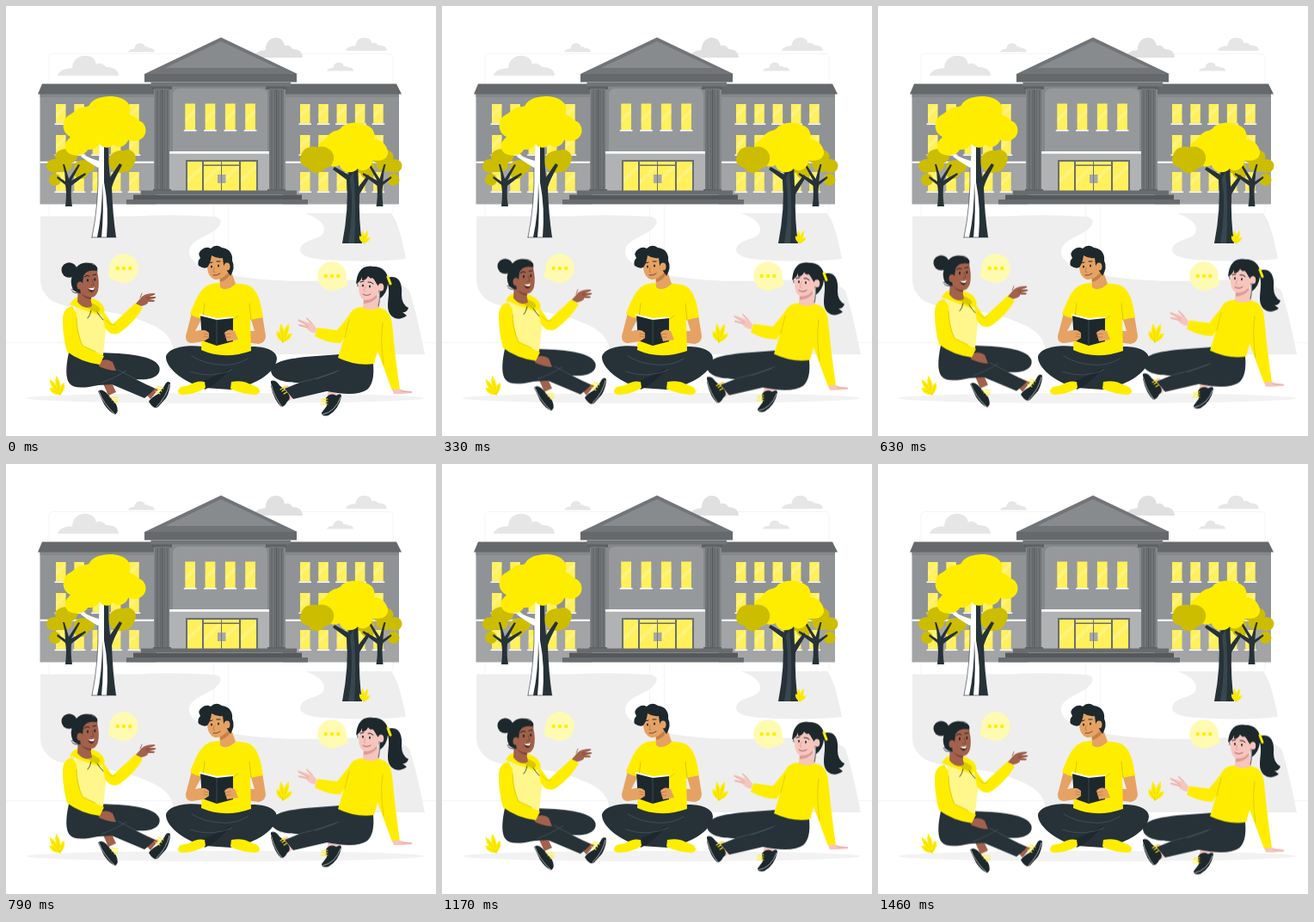
Recreate the animation shown at these times as an HTML page with a canvas. Size 500 by 500 pixels, loop 1.5 s.

```html
<!DOCTYPE html>
<html lang="en">
<head>
<meta charset="utf-8">
<title>Students in front of a school</title>
<style>
html, body { margin: 0; width: 100%; height: 100%; overflow: hidden; background: #fff; }
canvas { display: block; width: 500px; height: 500px; }
</style>
</head>
<body>
<canvas id="stage"></canvas>
<script>
const LOOP = 1500, PEAK = 690, LIFT = 10, START = 0.8;
const YELLOW = '#ffed00', PALE = '#fff68c', BUBBLE = '#fffab2', OCHRE = '#cdbd00', DARK = '#263238', INK = '#1d282d';
const BROWN = '#a2614b', BROWN_SHADE = '#7d4334', TAN = '#e5a263', PINK = '#f6c5bd', PINK_SHADE = '#dc9c96';
const WALL = '#8f9396', WALL_LIGHT = '#96999c', STONE = '#727577', STONE_DARK = '#5d6163', GROUND = '#eeeeee';

const canvas = document.getElementById('stage');
const scale = window.devicePixelRatio || 1;
canvas.width = canvas.height = 500 * scale;
let c = canvas.getContext('2d');

const fill = (color, d) => { c.fillStyle = color; c.fill(new Path2D(d)); };
const line = (color, width, d) => {
  c.strokeStyle = color;
  c.lineWidth = width;
  c.stroke(new Path2D(d));
};
const box = (color, x, y, w, h) => { c.fillStyle = color; c.fillRect(x, y, w, h); };
const oval = (color, x, y, rx, ry = rx) => {
  c.fillStyle = color;
  c.beginPath();
  c.ellipse(x, y, rx, ry, 0, 0, 7);
  c.fill();
};

function layer(paint) {
  const sheet = document.createElement('canvas');
  sheet.width = sheet.height = 500 * scale;
  const main = c;
  c = sheet.getContext('2d');
  c.scale(scale, scale);
  c.lineCap = c.lineJoin = 'round';
  paint();
  c = main;
  return sheet;
}

function cloud(x, y, w, h, color = '#e6e6e6') {
  const px = u => x + u * w, py = v => y + v * h;
  fill(color, `M${px(0)} ${py(1)}Q${px(.03)} ${py(.64)} ${px(.24)} ${py(.62)}
    C${px(.25)} ${py(-.2)} ${px(.62)} ${py(-.18)} ${px(.63)} ${py(.42)}
    Q${px(.72)} ${py(.3)} ${px(.79)} ${py(.56)}Q${px(.99)} ${py(.55)} ${px(1)} ${py(1)}Z`);
}

function glass(x, y, w, h) {
  box('#fff05c', x, y, w, h);
  c.save();
  c.beginPath();
  c.rect(x, y, w, h);
  c.clip();
  line('rgba(255,255,255,.2)', 4, `M${x - 3} ${y + h * .75}l${w + 6} ${-w - 6}`);
  c.restore();
}

function pane(x, y, w, h) {
  glass(x, y, w, h);
  box('#fff', x - 1.5, y + h, w + 3, 1.6);
}

function wing(x, w, firstWindow) {
  box(WALL, x, 102, w, 79);
  box('#a2a4a6', x, 181, w, 49.5);
  box('#858889', x, 102, w, 4);
  box('#fff', x, 180.7, w, 2);
  for (const y of [114, 150, 193])
    for (let i = 0; i < 5; i++) pane(firstWindow + i * 21.3, y, 11.5, 22.5);
}

function pillars(x) {
  box(STONE_DARK, x - 4, 93, 24, 4);
  box(STONE, x, 96, 17, 119);
  for (const dx of [2.5, 6, 10.5, 14]) box('#606466', x + dx, 98, 1, 117);
  box('#55595b', x + 8, 97, 1.2, 118);
  box(STONE_DARK, x - 2, 213, 21, 3);
}

function building() {
  wing(39.5, 135, 58);
  wing(322, 135, 342);
  fill('#66696b', 'M42 90.5H174V102.5H37Z');
  fill('#66696b', 'M322 90.5H454L460 102.5H322Z');

  box('#85888a', 172, 90, 153, 127);
  fill(WALL_LIGHT, 'M194 172V104Q194 96 202 96H296Q304 96 304 104V172Z');
  box('#b0b2b4', 190, 172, 116, 43);
  for (let i = 0; i < 4; i++) pane(208.3 + i * 23.3, 113.5, 11.7, 30.5);
  box('#fff', 190, 169, 117, 2.8);
  pillars(173);
  pillars(306);

  fill(STONE, 'M161 79L250 36.5L339 79Z');
  fill('#888b8d', 'M185 72L250 41L316 72Z');
  box('#66696b', 161, 79, 177, 9.5);
  box(STONE, 168.5, 88.5, 162.5, 5);

  box('#6b6e70', 209, 179, 84, 37);
  glass(211, 181, 17, 34.5);
  for (const x of [230, 251]) {
    glass(x, 181, 20, 3.5);
    glass(x, 186, 20, 29.5);
  }
  glass(273, 181, 18, 34.5);
  box('#a5a7a8', 246, 196, 9.5, 10);
  box('#777', 250, 196, 1, 10);

  box('#696c6e', 157, 214.5, 181, 5);
  box('#56595b', 148, 219.5, 196, 5.5);
  box('#696c6e', 140, 225, 211, 5.5);
}

function smallTree(x, flip) {
  c.save();
  c.translate(x, 0);
  c.scale(flip, 1);
  for (const [dx, y, rx, ry] of [[-3, 175, 13, 9], [-17, 186, 9, 8], [18, 187, 12, 8], [14, 195, 8, 6], [-6, 185, 10, 8], [-16, 202, 7, 7]])
    oval(OCHRE, dx, y, rx, ry);
  fill(DARK, 'M-4 233Q-2 215-4 208L-14 200L-13 198L-4 204Q-4 194-7 184L-5 184L0 201L11 184L13 185L3 203L19 194L20 196L3 209Q2 222 4 233Z');
  c.restore();
}

function trees() {
  smallTree(73, 1);
  smallTree(434.5, -1);

  oval(OCHRE, 134, 181, 15, 13);
  oval(OCHRE, 141, 177, 10, 10);
  fill('#fff', 'M100 269Q108 230 107 188Q98 183 87 175L89 172Q99 178 108 180L109 155H119L118 269Z');
  fill(DARK, 'M117 269Q120 235 114 205Q114 185 114 163L119 160Q119 185 121 199L132 183L135 185Q125 203 123 211Q124 242 128 269Z');
  fill(DARK, 'M106 269Q112 242 112 205Q114 240 111 269Z');
  line(DARK, .6, 'M100 269Q108 230 107 188M100 269H128');
  fill(YELLOW, `M82 121C89 115 95 119 97 115C103 103 133 101 142 113Q146 119 143 125
    C149 129 153 131 154 133C164 136 165 149 158 154C149 160 145 155 142 156
    C138 166 127 165 125 161C120 167 111 165 109 160C104 167 99 167 95 167
    C91 176 72 176 69 166C67 158 74 154 75 152C63 147 65 130 75 126Q78 124 82 121Z`);

  fill(DARK, 'M391 276Q399 235 396 202L380 190L382 187L398 196L399 180H409L410 210L421 196L423 199L411 219Q410 248 414 276Z');
  fill('#37474f', 'M398 276Q405 235 400 200L404 192Q408 235 405 276Z');
  fill(YELLOW, `M376 149C383 143 386 147 391 140C400 133 419 135 426 143Q430 150 428 155
    C440 155 445 167 444 172C441 182 431 179 426 180C426 190 413 194 409 189
    C403 197 389 193 388 185C380 189 371 185 374 177C360 175 360 159 369 157Q372 153 376 149Z`);
  fill(OCHRE, 'M343 174C345 165 354 162 362 164C374 161 383 170 381 179C379 187 374 188 371 189C366 196 354 196 352 188C344 187 340 181 343 174Z');
}

function sprout(x, y, size, tilt) {
  c.save();
  c.translate(x, y);
  c.rotate(tilt);
  c.scale(size, size);
  for (const [turn, length] of [[-.6, 15], [-.2, 22], [.2, 23], [.7, 15]]) {
    c.save();
    c.rotate(turn);
    fill(YELLOW, `M0 0Q-6 ${-length * .55} 0 ${-length}Q5 ${-length * .55} 0 0Z`);
    line('#d9ca00', .5, `M0 0L0 ${-length * .7}`);
    c.restore();
  }
  c.restore();
}

function grounds() {
  line('#f5f5f5', 1, 'M50 330V60Q50 55.5 55 55.5H445Q450 55.5 450 60V240M0 391.5H500M241.5 231V330M258.5 231V330M55 330H241M258 330H460');
  cloud(60, 58, 71, 23);
  cloud(142, 43.5, 31, 10);
  cloud(288, 37, 57, 23, '#e0e0e0');
  cloud(395, 37, 48, 15);
  cloud(373, 66, 31, 9.5);
  fill(GROUND, `M40 244.5H150Q195 242 243 245Q253 248 248 255C243 266 215 270 213 284
    C211 304 250 315 315 319C382 323 447 310 469 331Q477 355 487 405H195
    C195 381 178 373 150 363C111 350 67 355 50 340Q40 330 40 319Z`);
  fill(GROUND, 'M348 241H448Q457 252 465 294Q423 299 371 295C352 294 338 289 343 280C348 270 370 272 370 260Q370 249 348 241Z');
  oval('#f2f2f2', 255, 456, 231, 6);
}

function bubble(x, y, side) {
  oval(BUBBLE, x, y, 16.8);
  fill(BUBBLE, `M${x + side * 9} ${y + 14}Q${x + side * 15} ${y + 14} ${x + side * 19} ${y + 9}L${x + side * 16} ${y}Z`);
  for (const dx of [-7.3, 0, 7.3]) oval(YELLOW, x + dx, y, 2.2);
}

function boy() {
  fill(DARK, `M229 396C205 393 186 399 186 409C187 423 210 439 231 444L261 446
    C284 443 314 428 315 410C315 397 290 394 276 397Z`);
  fill(INK, 'M227 437Q247 429 262 420Q252 433 239 442L231 446Z');
  line('#52616a', .6, 'M216 407Q230 416 249 417Q267 419 281 410M214 425Q239 434 263 423');
  fill(TAN, 'M229 437L218 440L230 445ZM263 438L279 440L266 445Z');
  fill(YELLOW, 'M231 437Q222 435 213 441L203 443Q196 450 205 452Q222 451 232 444Z');
  fill(YELLOW, 'M262 437Q275 435 282 439L292 443Q299 450 290 452Q273 451 261 445Z');

  fill(TAN, 'M216 357L209 384Q209 392 216 392L237 389Q240 379 231 376L220 378L231 357Z');
  fill(TAN, 'M284 361L289 378L263 377Q253 380 256 388L294 393Q302 391 302 384L298 359Z');
  fill(YELLOW, `M247 322C230 323 225 330 214 358Q220 363 229 363L227 400Q254 412 285 401
    L284 365L299 362C296 340 291 327 279 324L264 322Z`);
  line('#cfbf00', .8, 'M231 346L229 363M283 346L285 365M247 374Q258 371 270 360');
  fill(TAN, 'M248 308L249 327Q256 333 267 323L261 306Z');
  fill('#c58047', 'M249 316Q256 314 260 308L259 315Q254 320 249 321Z');

  fill(TAN, 'M234 293C233 307 235 315 243 318Q252 319 258 309Q263 307 262 300L255 286Q240 285 234 293Z');
  fill(INK, `M224 302Q222 297 226 293Q222 287 228 283Q233 279 238 282Q244 276 251 281
    C261 282 264 290 263 296Q267 304 261 314L257 308L253 301L252 293Q245 294 239 290
    Q238 299 234 304Q230 306 224 302Z`);
  oval(TAN, 257, 303, 3.5, 4.5);
  oval(INK, 239, 303, 1, 1.6);
  oval(INK, 247, 302, 1, 1.6);
  line(INK, 1, 'M236 299L240 298M245 297L249 297');
  line('#b9743e', .8, 'M242 304L241 309L243 309.5');
  line('#6e3f2a', .9, 'M241 313Q245 314 249 311');

  fill(INK, 'M226 359L245 364L264 362L264 390L245 395L228 389Z');
  fill('#fff', 'M225 358L245 363L264 361.5L264 363L245 365L225 360Z');
  line('#465258', .8, 'M245 365V394');
  fill(TAN, 'M224 379Q230 374 236 380L236 386L230 390L222 389ZM254 380Q259 374 266 378L270 388L257 390Z');
  line('#b9743e', .7, 'M230 381L236 382M230 384L236 385M255 382L261 381M255 385L261 385');
}

function shoe(d, laces) {
  fill(INK, d);
  line('#fff', .6, laces[0]);
  line(YELLOW, 1.1, laces[1]);
}

function leftGirl() {
  fill(BROWN, 'M112 437L119 453L128 449L121 434ZM158 446L168 457L177 446L165 441Z');
  shoe('M107 448Q111 444 117 450L122 456L128 463Q132 472 127 475Q120 472 114 463Z',
    ['M108 448Q113 462 126 474', 'M121 455L130 455M123 458L130 458M126 461L130 460']);
  shoe('M166 460Q169 455 177 451L184 442Q187 435 191 438Q191 447 186 456L177 466Q172 470 166 460Z',
    ['M190 440Q187 454 175 466', 'M175 444L181 448M177 442L183 445M174 448L179 451']);
  fill(DARK, `M73 403Q67 431 74 439Q80 447 107 441L123 440L161 456Q169 450 173 445
    L151 434C174 436 181 427 178 419C172 406 140 404 108 403Z`);
  line('#52616a', .6, 'M111 438Q124 434 140 424M130 423L151 434');
  fill(BROWN, 'M109 413Q117 409 124 414L128 424Q119 424 108 419Z');

  fill(PALE, 'M81 347L110 350Q119 361 116 378L113 406Q96 412 78 402Z');
  fill(YELLOW, 'M77 349Q66 351 66 365Q66 385 71 402Q87 414 109 417L114 407L89 395Q82 376 82 357Z');
  fill(YELLOW, 'M111 352Q118 362 124 370L151 345L159 351Q149 368 132 380Q122 385 115 374Z');
  line('#d6c700', .8, 'M82 363Q82 380 89 395L104 402M116 365Q122 373 127 370');
  fill(YELLOW, 'M74 347Q79 337 90 338Q110 340 114 351Q117 358 106 359Q89 353 74 347Z');
  fill('#d8c900', 'M83 342Q96 342 108 350Q112 356 104 356Q92 350 83 342Z');
  line(INK, .8, 'M99 354Q98 360 95 363M106 356Q109 361 113 365');
  fill(BROWN, 'M151 346L158 338Q162 334 173 334L172 336L165 338L174 338L173 340L166 341L173 342L172 344L165 344Q166 347 157 349Z');
  line(BROWN_SHADE, .7, 'M163 339L173 335M164 341L174 339M156 339L158 334');

  fill(BROWN, 'M84 326L83 344Q91 354 100 349L97 333Z');
  fill(BROWN_SHADE, 'M87 334Q94 340 99 336L99 341Q92 341 87 334Z');
  fill(BROWN, 'M86 309Q99 301 106 309Q109 321 107 331Q105 338 99 339Q89 338 84 327Z');
  oval(INK, 73.5, 307, 9, 8.7);
  fill(INK, 'M78 330Q73 319 79 310C83 296 98 296 106 304Q107 306 105 308Q94 306 90 314L89 323L86 324Q86 331 87 334Q81 333 78 330Z');
  oval(BROWN, 86, 325, 3.5, 4.5);
  line(INK, .8, 'M103 303Q106 305 106 309M80 328Q78 331 76 330M84 334Q79 334 77 332M98 299Q106 300 106 307');
  oval(INK, 95, 319, 1.1, 1.7);
  oval(INK, 103.3, 318, 1.1, 1.7);
  line(INK, 1, 'M91 315Q94 312 97 314M101 313L105 312');
  line(BROWN_SHADE, .9, 'M100 318L102 324L99 325');
  fill('#5b2a23', 'M95 328Q99 329 103 327Q103 333 99 333Q96 332 95 328Z');
  fill('#fff', 'M95 328Q99 329 103 327L102 330Q98 331 95 328Z');
}

function rightGirl() {
  fill(PINK, 'M319 444L330 459L338 451L327 441ZM375 448L371 462L382 465L387 451Z');
  shoe('M308 436Q313 434 318 441L327 449Q333 456 327 460Q324 466 320 466Q312 459 308 442Z',
    ['M308 439Q312 455 321 466', 'M319 446L325 442M321 448L327 444M323 451L328 448']);
  shoe('M372 456Q377 449 384 453Q390 449 390 454Q387 469 375 476Q367 478 367 473L373 465Z',
    ['M368 475Q383 472 389 455', 'M367 460L374 460M366 463L374 463M367 458L374 457']);
  fill(DARK, `M388 405C354 408 309 408 308 424C309 435 325 438 341 438L324 445L334 457
    L373 448Q407 455 420 446Q429 438 427 416Z`);
  line('#52616a', .6, 'M341 438Q364 433 387 424M383 426L360 434');

  fill(YELLOW, `M414 350Q403 350 398 361L385 377L362 374L359 384Q377 393 389 392L393 386L386 409
    Q407 419 428 416L432 401L449 447L458 446Q453 413 449 370Q447 353 434 351Z`);
  line('#d6c700', .8, 'M399 365L394 385M438 369Q435 389 439 417');
  fill(PINK, 'M361 375Q357 368 349 362L349 364L354 369L340 364L339 366L349 371L340 370L340 372L349 374Q353 380 360 380Z');
  line(PINK_SHADE, .7, 'M341 366L352 372M341 371L351 374M350 363L356 369');
  fill(PINK, 'M449 446Q458 444 462 447L472 448L472 450L460 451L451 451Z');
  line(PINK_SHADE, .7, 'M460 448L471 449');

  fill(INK, 'M443 316C459 311 461 326 460 336Q460 347 468 351Q466 357 461 356L466 360Q456 367 449 361C439 352 448 337 444 323Z');
  fill(PINK, 'M416 335L415 351Q423 355 434 351L432 333Z');
  fill(PINK_SHADE, 'M416 341Q424 342 431 334L431 339Q425 346 416 346Z');
  fill(PINK, 'M412 314L410 327Q410 339 417 342Q428 342 434 332L438 321L430 310Q420 306 412 314Z');
  fill(INK, `M407 323Q408 313 411 309Q416 301 428 303C440 303 446 313 444 323Q443 334 435 340
    L435 328Q431 324 428 318L426 316Q424 318 421 314Q419 319 414 319L414 315Q412 321 407 323Z`);
  oval(PINK, 436, 327, 3.3, 4.5);
  line(INK, .8, 'M434 331Q435 343 433 349M411 315Q408 319 409 326');
  line(YELLOW, 3, 'M444 315L447 323');
  oval(INK, 415, 325, 1, 1.6);
  oval(INK, 423, 326, 1, 1.6);
  line(INK, 1, 'M412 321L416 320M421 321Q424 320 427 323');
  line(PINK_SHADE, .8, 'M418 326L416 331L418 332');
  line('#994f52', .9, 'M415 335Q419 338 424 335');
}

const backdrop = layer(() => {
  box('#fff', 0, 0, 500, 500);
  grounds();
  building();
  trees();
  sprout(416, 276, .68, .1);
  sprout(322, 391, 1, .1);
  sprout(63, 452, 1, -.4);
  bubble(137, 305, -1);
  bubble(379, 314, 1);
  boy();
});
const girls = layer(() => {
  leftGirl();
  rightGirl();
});

function draw(now) {
  const t = now % LOOP;
  const gap = Math.abs(t - PEAK);
  const rise = LIFT * (1 - Math.min(gap, LOOP - gap) / (LOOP / 2));
  c.drawImage(backdrop, 0, 0);
  c.drawImage(girls, 0, (START - rise) * scale);
  requestAnimationFrame(draw);
}
requestAnimationFrame(draw);
</script>
</body>
</html>
```
